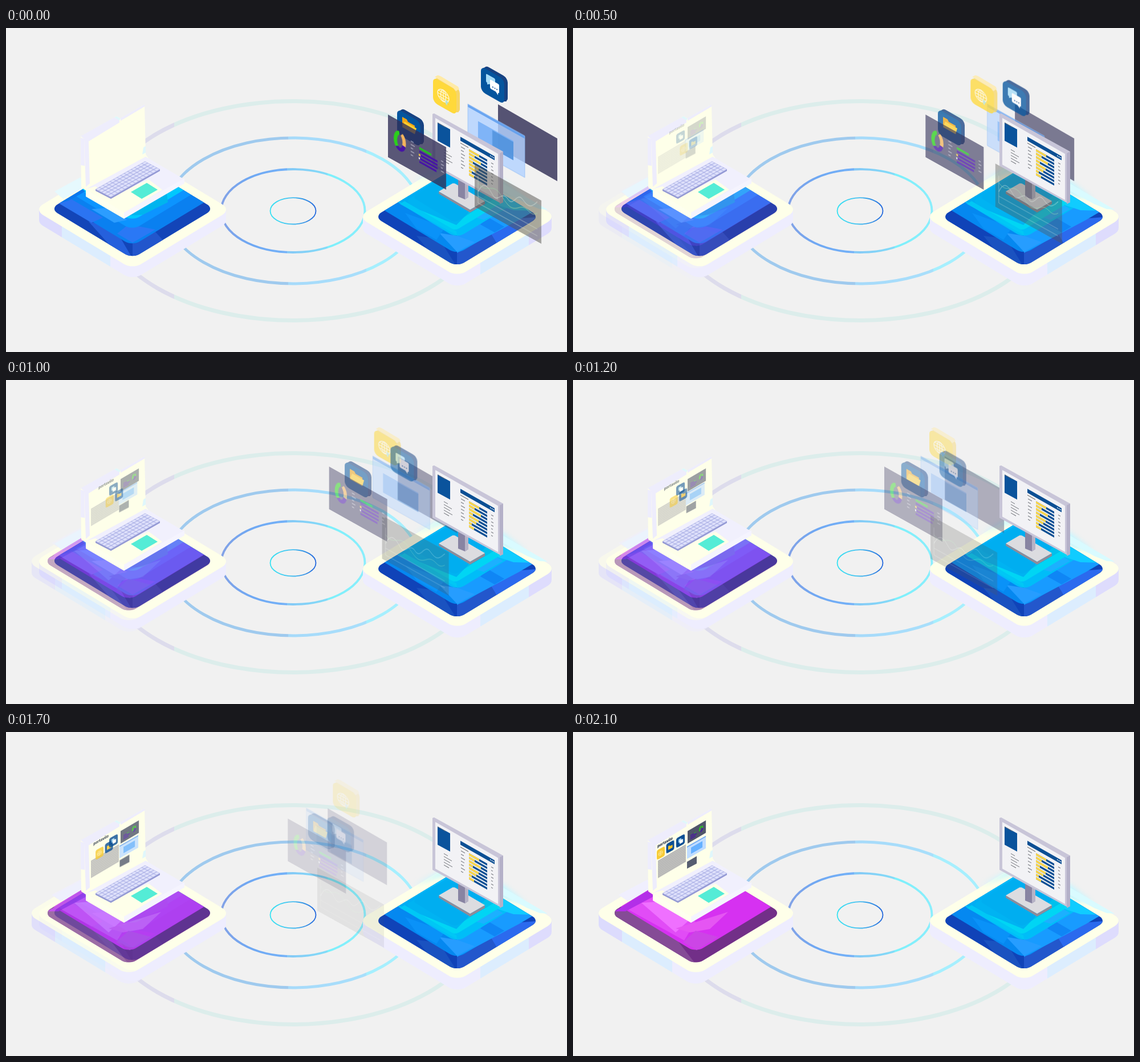
These frames come from a looping animation (984 px wide and 569 px high, 2.2 s). An HTML page without scripts:

```html
<!DOCTYPE html>
<html lang="en">
<head>
<meta charset="utf-8">
<title>Data transfer</title>
<style>
html,body{margin:0;width:100%;height:100%;overflow:hidden;background:#f1f1f1}
svg{display:block;width:984px;height:569px}
.fly,.land{animation:fly 2.2s steps(22,jump-none) infinite}
.land{animation-name:land}
@keyframes fly{
  from{transform:none;opacity:1}
  to{transform:translate(var(--x,0px),var(--y,0px));opacity:0}
}
@keyframes land{
  from{transform:translate(var(--x,0px),var(--y,0px));opacity:0}
  to{transform:none;opacity:1}
}
.brand{font:800 6px Inter,"Open Sans",sans-serif;fill:#16203c;text-anchor:middle}
.ring{fill:none}
</style>
</head>
<body>
<svg viewBox="0 0 984 569">
<defs>
  <linearGradient id="r1"><stop stop-color="#35e2f2"/><stop offset=".5" stop-color="#45bdf0"/><stop offset="1" stop-color="#2468dc"/></linearGradient>
  <linearGradient id="r2"><stop stop-color="#83a2e6"/><stop offset=".2" stop-color="#6fa8f3"/><stop offset=".46" stop-color="#74b2f8"/><stop offset=".46" stop-color="#85c8f6"/><stop offset=".74" stop-color="#82dcf8"/><stop offset=".74" stop-color="#7cf0fb"/><stop offset="1" stop-color="#8aeefc"/></linearGradient>
  <linearGradient id="r3"><stop offset=".48" stop-color="#9fcaee"/><stop offset=".48" stop-color="#a6dafa"/><stop offset=".79" stop-color="#a8dffb"/><stop offset=".79" stop-color="#a6effe"/></linearGradient>
  <linearGradient id="r4"><stop offset=".19" stop-color="#dddcec"/><stop offset=".19" stop-color="#dcedeb"/></linearGradient>
  <linearGradient id="wallA" gradientUnits="userSpaceOnUse" x1="58" x2="386"><stop offset=".122" stop-color="#dcdbfd"/><stop offset=".122" stop-color="#dcedfe"/><stop offset=".381" stop-color="#dcedfe"/><stop offset=".381" stop-color="#eeedfe"/></linearGradient>
  <linearGradient id="wallB" gradientUnits="userSpaceOnUse" x1="45" x2="386"><stop offset=".12" stop-color="#dcdbfd"/><stop offset=".12" stop-color="#dcedfe"/><stop offset=".378" stop-color="#dcedfe"/><stop offset=".378" stop-color="#eeedfe"/></linearGradient>
  <linearGradient id="wallC" gradientUnits="userSpaceOnUse" x1="626" x2="957"><stop offset=".622" stop-color="#eeedfe"/><stop offset=".622" stop-color="#dcedfe"/><stop offset=".878" stop-color="#dcedfe"/><stop offset=".878" stop-color="#dedcfd"/></linearGradient>
  <filter id="soft" x="-20%" y="-20%" width="140%" height="140%"><feGaussianBlur stdDeviation="4"/></filter>

  <rect id="sq" x="-100" y="-100" width="200" height="200" rx="17" transform="matrix(.866 .525 -.866 .525 0 0)"/>
  <clipPath id="tileA"><use href="#sq" transform="translate(221.5 317.500) scale(.83)"/></clipPath>
  <clipPath id="tileB"><use href="#sq" transform="translate(215.500 318) scale(.866)"/></clipPath>
  <clipPath id="tileC"><use href="#sq" transform="translate(791 331.500) scale(.838)"/></clipPath>

  <pattern id="keys" width="1" height="1" patternUnits="userSpaceOnUse"><rect width="1" height="1" fill="#a3a8e2"/><rect x=".07" y=".1" width=".86" height=".8" fill="#dfe1fb"/></pattern>
  <pattern id="rows" width="50" height="3" patternUnits="userSpaceOnUse"><rect width="50" height="3" fill="#c2c2c0"/><rect y="1" width="50" height=".8" fill="#a9a9a9"/></pattern>

  <!-- thick rounded app tile: depth in currentColor, face in fill -->
  <g id="app">
    <g transform="matrix(1 .57 0 1 0 0)">
      <rect x="6" y="-4" width="41" height="44" rx="8" fill="currentColor"/>
      <path d="M3 4 9-2 44-2 39 4ZM39 42 45 38 45 5 39 6Z" fill="currentColor"/>
      <rect y="2" width="41" height="44" rx="8"/>
    </g>
  </g>
  <g id="globe" fill="none" stroke="#fff8dc" stroke-width="1.300">
    <g transform="matrix(1 .57 0 1 18 35)"><circle r="10"/><ellipse rx="4.500" ry="10"/><path d="M-10 0H10M0-10V10M-8.500-5H8.500M-8.500 5H8.500"/></g>
    <path d="M22 41 28 48 25 48 25 52 22 49Z" fill="#b9e3d0" stroke="none"/>
  </g>
  <g id="folder" transform="matrix(1 .57 0 1 9 12)">
    <path d="M0 4H8L10 7H22V20H0Z" fill="#f0a515"/><path d="M4 10H25L22 22H0Z" fill="#ffcf2d"/>
  </g>
  <g id="chat" transform="matrix(1 .57 0 1 9 13)">
    <path d="M2 2H14Q16 2 16 4V15Q16 17 14 17H6L2 20V17Q0 17 0 15V4Q0 2 2 2Z" fill="#a5dcf8"/>
    <path d="M9 8H21Q23 8 23 10V22Q23 24 21 24V28L17 24H9Q7 24 7 22V10Q7 8 9 8Z" fill="#fff"/>
    <path d="M11 19H20" stroke="#134f91" stroke-width="1.800" stroke-dasharray="1.800 1.800"/>
  </g>
  <g id="stats">
    <path d="M0 0H102V75H0Z" fill="#312e57" fill-opacity=".79"/>
    <g fill="none" stroke-width="6" transform="translate(21 35)">
      <path d="M-1-14A7.500 14 0 0 0-5 11" stroke="#2bd01b"/>
      <path d="M-5 11A7.500 14 0 0 0 7 5" stroke="#4612a6"/>
      <path d="M7 5A7.500 14 0 0 0 3-13" stroke="#f4b45c"/>
    </g>
    <path d="M40 24H45M40 30H47M40 36H44M40 42H46M40 48H44M93 29H97M93 35H98M93 41H96M93 47H98" stroke="#d8d8e4"/>
    <path d="M55 28H76" stroke="#20c51c" stroke-width="3.500"/>
    <path d="M55 34H87M55 40H87M55 46H87M55 52H85" stroke="#4612a6" stroke-width="3.500"/>
    <path d="M54 40H57" stroke="#ffd23a" stroke-width="3"/><path d="M54 46H56" stroke="#fff" stroke-width="3"/>
  </g>
</defs>

<rect width="984" height="569" fill="#f1f1f1"/>
<g class="ring">
  <ellipse cx="503.500" cy="321" rx="336" ry="192.500" stroke="url(#r4)" stroke-width="7"/>
  <ellipse cx="503.500" cy="321" rx="222" ry="128" stroke="url(#r3)" stroke-width="5"/>
  <ellipse cx="503.500" cy="321" rx="126" ry="73" stroke="url(#r2)" stroke-width="3.800"/>
  <ellipse cx="503.500" cy="321.300" rx="40" ry="23.200" stroke="url(#r1)" stroke-width="1.800"/>
</g>

<!-- left platform, blue -->
<g fill="url(#wallA)"><path d="M58 319H386V338H58Z"/><g transform="translate(0 19)"><path d="M58 319H386"/></g></g>
<clipPath id="hullA"><use href="#sq" transform="translate(222 338) scale(.996)"/></clipPath>
<rect x="50" y="230" width="345" height="215" fill="url(#wallA)" clip-path="url(#hullA)"/>
<use href="#sq" transform="translate(222 319) scale(.996)" fill="#feffe9"/>
<path d="M85 287 131 262 136 281 100 300Z" fill="#e6f9fd"/>
<g clip-path="url(#tileA)">
  <path d="M80 230H365V405H80Z" fill="#1345b8"/>
  <path d="M145 340 190 350 222 405 185 385Z" fill="#2560dc"/>
  <path d="M222 375 262 358 282 380 222 405Z" fill="#2256cc"/>
  <use href="#sq" transform="translate(221.500 295.500) scale(.83)" fill="#0a80f0"/>
  <path d="M86 304 110 298 170 333 150 342Z" fill="#2b74f2"/>
  <path d="M222 377 195 361 215 345 262 354Z" fill="#2a78f5"/>
  <use href="#sq" transform="translate(221.500 268) scale(.83)" fill="#0c94ff"/>
  <path d="M150 318 180 316 212 337 190 342Z" fill="#2c9dff"/>
  <use href="#sq" transform="translate(221.500 252) scale(.83)" fill="#00c8fd"/>
  <path d="M205 330 282 290 284 306 240 328Z" fill="#00b4ee"/>
  <path d="M85 310 131 281 139 287 110 303Z" fill="#0878ee"/>
</g>

<!-- left platform, magenta -->
<g class="land">
  <clipPath id="hullB"><use href="#sq" transform="translate(215.500 338.500) scale(1.036)"/></clipPath>
  <path d="M45 319H386V338H45Z" fill="url(#wallB)"/>
  <rect x="40" y="230" width="350" height="215" fill="url(#wallB)" clip-path="url(#hullB)"/>
  <use href="#sq" transform="translate(215.500 318.500) scale(1.036)" fill="#feffe9"/>
  <path d="M80 286 131 259 136 281 96 297Z" fill="#f0effe"/>
  <g clip-path="url(#tileB)">
    <path d="M70 230H365V410H70Z" fill="#722f88"/>
    <path d="M70 310H140L217 410H70Z" fill="#854b96"/>
    <use href="#sq" transform="translate(215.500 296) scale(.866)" fill="#d631f1"/>
    <path d="M88 307 128 283 215 333 195 366Z" fill="#e14cf6"/>
    <path d="M120 300 150 298 204 330 180 352Z" fill="#ef70ff"/>
    <path d="M180 345 272 316 240 346 205 352Z" fill="#e555f3"/>
    <path d="M217 383 193 369 215 349 255 360Z" fill="#cc45e6"/>
    <path d="M73 315 131 279 143 288 92 315Z" fill="#b32fe8"/>
  </g>
</g>

<!-- laptop -->
<path d="M131 191 194 155 201 159 243 134 245 222 250 229 147 290 132 280Z" fill="#feffe9"/>
<path d="M131 190 190 157 199 161 199 166 145 199 147 273 140 279 137 195ZM201 158 243 134 243 138 201 163Z" fill="#eeedfc"/>
<path d="M131 192 137 195 138 242 131 241Z" fill="#eeedfc"/>
<path d="M190 157 194 155 201 159 199 162Z" fill="#e0f7fb"/>
<path d="M239 222 245 219 245 207 241 210Z" fill="#e0f7fb"/>
<path d="M140 283 245 226 313 266 207 327Z" fill="#f1f0fd"/>
<path d="M140 283 157 278 184 297 250 266 274 284 207 325Z" fill="#feffe9"/>
<path d="M140 283 207 324 207 335 140 296Z" fill="#feffee"/>
<path d="M207 324 313 264 313 273 207 335Z" fill="#f5f4fe"/>
<path d="M157 283 184 297 270 248 270 251 184 300 157 286Z" fill="#9298d4"/>
<rect width="14" height="5" fill="url(#keys)" transform="matrix(6.2 -3.500 5.300 2.800 157 283)"/>
<path d="M219 288 247 272 266 284 238 300Z" fill="#54ecd6"/>

<!-- laptop screen content -->
<g class="land"><rect width="49" height="31" fill="url(#rows)" transform="matrix(1 -.59 0 1 149 226)"/></g>
<g class="land"><g transform="matrix(1 -.59 0 1 201 174)">
  <path d="M0 0H32V22H0Z" fill="#50566a"/>
  <g fill="none" stroke-width="2.200"><path d="M24 6A2.500 4 0 0 0 22 13" stroke="#2bd01b"/><path d="M22 13A2.500 4 0 0 0 26 10" stroke="#4612a6"/><path d="M26 10A2.500 4 0 0 0 25 6" stroke="#2bd01b"/></g>
  <path d="M5 11H15M5 14H16M5 17H14" stroke="#4612a6" stroke-width="1.600"/>
  <path d="M11 10.500H15" stroke="#2bd01b"/>
</g></g>
<g class="land" style="--x:-5px;--y:-6px"><g transform="matrix(1 -.57 0 1 200 201)">
  <path d="M0 0H33V22H0Z" fill="#bfdcff"/><path d="M0 0H33V2H0Z" fill="#70a9f2"/><path d="M7 6H27V17H7Z" fill="#66b1ff"/>
</g></g>
<g class="land" style="--x:-3px;--y:-14px"><path d="M200 228 217 218 217 231 200 240Z" fill="#565d70"/></g>
<g class="land" style="--x:27px;--y:-22px"><text class="brand" transform="matrix(1 -.55 0 1 161.500 196)">portavilo</text></g>
<g class="land" style="--x:53px"><g transform="matrix(1 -.55 0 1 147 208)">
  <rect width="14" height="17" rx="3" fill="#f7cb35"/><g fill="none" stroke="#fff3c0" stroke-width=".7"><circle cx="6.500" cy="8.500" r="3.500"/><path d="M3 8.500H10M6.500 5V12"/></g>
</g></g>
<g class="land" style="--x:53px"><g transform="matrix(1 -.55 0 1 163.500 197)">
  <rect width="14" height="17" rx="3" fill="#0b4f94"/><path d="M3.500 5.500H6L7 7H11V12H3.500Z" fill="#ffc629"/>
</g></g>
<g class="land"><g transform="matrix(1 -.55 0 1 181 187)">
  <rect width="15" height="17" rx="3" fill="#0b4f94"/><rect x="4" y="4" width="5" height="6" rx="1" fill="#a5dcf8"/><rect x="6" y="7" width="6" height="6" rx="1" fill="#fff"/>
</g></g>

<!-- right platform -->
<clipPath id="hullC"><use href="#sq" transform="translate(791.500 352) scale(1.005)"/></clipPath>
<path d="M626 331H957V352H626Z" fill="url(#wallC)"/>
<rect x="620" y="240" width="345" height="220" fill="url(#wallC)" clip-path="url(#hullC)"/>
<use href="#sq" transform="translate(791.500 331.500) scale(1.005)" fill="#feffe9"/>
<path d="M715 270 785 232 872 268 912 300 880 296 780 248Z" fill="#c4f6ff" filter="url(#soft)"/>
<path d="M866 283 914 309 936 318 950 319 873 274Z" fill="#d9fbff"/>
<g clip-path="url(#tileC)">
  <path d="M650 240H932V420H650Z" fill="#1043b8"/>
  <path d="M720 365 760 370 791 420H765Z" fill="#1a52c0"/>
  <path d="M791 380 850 350 865 380 791 420Z" fill="#2357cc"/>
  <path d="M850 360 895 335 932 332 865 385Z" fill="#2b6aee"/>
  <use href="#sq" transform="translate(791 309.500) scale(.838)" fill="#0588f0"/>
  <path d="M791 345 860 310 929 320 900 337 791 395Z" fill="#189bff"/>
  <path d="M760 360 791 365 822 376 791 393Z" fill="#269dff"/>
  <path d="M832 345 845 332 874 349 857 359Z" fill="#0f86f5"/>
  <path d="M700 325 770 350 755 372 720 352Z" fill="#0a92f8"/>
  <use href="#sq" transform="translate(791 281) scale(.838)" fill="#00bdf8"/>
  <path d="M838 337 872 318 850 305 815 330Z" fill="#1cb0ff"/>
  <path d="M860 310 890 320 929 321 872 290Z" fill="#10ccff"/>
  <use href="#sq" transform="translate(787 304) scale(.5)" fill="#00d5f4"/>
  <use href="#sq" transform="translate(787 297) scale(.43)" fill="#00c0ec"/>
  <path d="M690 305 790 248 850 285 790 346Z" fill="#00a8f2" opacity=".75"/>
  <path d="M699 304 790 357 791 364 691 309Z" fill="#00c7f5"/>
</g>

<!-- pieces behind the monitor -->
<g class="fly" style="--x:-369px"><path d="M863 134 967 194V269L863 210Z" fill="#555373"/></g>
<g class="fly" style="--x:-350px"><g transform="matrix(1 .56 0 1 810 133.500)">
  <path d="M0 0H100V73H0Z" fill="#b2d2ff" fill-opacity=".82"/>
  <path d="M0 0H100V5H0Z" fill="#5b9cee" fill-opacity=".85"/>
  <path d="M18 20H80V54H18Z" fill="#70acf6" fill-opacity=".8"/>
  <path d="M43 22H80V54H43Z" fill="#3f86d2" fill-opacity=".6"/>
  <path d="M0 0H100V73H0Z" fill="none" stroke="#8fbcf5" stroke-width=".8"/>
</g></g>
<g class="fly" style="--x:-217px"><g transform="translate(749 84)"><g fill="#ffd93b" color="#f7d667"><use href="#app"/></g><path d="M3 2 8-1Q10-1 14 1L44 19 46 23 40 27 36 22Z" fill="#ffeaa6"/><use href="#globe"/></g></g>
<g class="fly" style="--x:-333px;--y:99px"><g transform="translate(833 65)"><g fill="#04559e" color="#174282"><use href="#app"/></g><use href="#chat"/></g></g>

<!-- monitor -->
<path d="M759 287 814 319 840 304V309L814 324 759 291Z" fill="#8f8b98"/>
<path d="M759 287 783 273Q786 272 789 274L840 304 814 319Z" fill="#dcdce0"/>
<path d="M793 262H811V297L805 301 793 296Z" fill="#8884a2"/><path d="M805 268H811V297L805 301Z" fill="#b6b3c6"/>
<path d="M748 151 751 150 872 217V306L868 308 748 242Z" fill="#c8c5d8"/>
<path d="M866 220 872 217V306L866 309Z" fill="#b4b0c8"/>
<path d="M753 158 863 221V302L753 240Z" fill="#f2f2f5"/>
<path d="M757 166 779 178V210L757 198Z" fill="#0a539c"/>
<g transform="matrix(1 .57 0 1 797 191)">
  <path d="M0 0H60V7H0Z" fill="#0b4f94"/>
  <path d="M52 3.500H59" stroke="#fff" stroke-width="1.600" stroke-dasharray="1.600 1.100"/>
  <path d="M0 11H14" stroke="#555"/>
  <path d="M1 17H8M1 23H6M1 29H8M1 35H7M1 41H6M1 47H8M1 53H5M54 15H58M54 21H57M54 27H58M54 33H58M54 39H57M54 45H58M54 51H57" stroke="#777a80" stroke-width="1.200"/>
  <path d="M15 15H47M15 21H47M15 27H47M15 33H47M15 39H47M15 45H47M15 51H47M15 57H47" stroke="#0b4f94" stroke-width="3.800"/>
  <path d="M15 15H33M15 21H25M15 27H36M15 33H22M15 39H32M15 45H28M15 51H20M15 57H24" stroke="#ffd84a" stroke-width="3.800"/>
  <path d="M-40-2H-26M-29 39H-22M-29 44H-15M-29 49H-18M-29 54H-14M-29 59H-20" stroke="#6f7278" stroke-width="1.100"/>
</g>

<!-- pieces in front -->
<g class="fly" style="--x:-193px"><g transform="translate(686 140)"><g fill="#04559e" color="#174282"><use href="#app"/></g><use href="#folder"/></g></g>
<g class="fly" style="--x:-217px"><use href="#stats" transform="matrix(1 .56 0 1 670 152)"/></g>
<g class="fly" style="--x:-341px"><g transform="matrix(1 .556 0 1 822 238)">
  <path d="M0 0H117V76H0Z" fill="#55524f" fill-opacity=".5"/>
  <g fill="none" stroke="#d5dfd8" stroke-width=".8">
    <path d="M6 18V66H110M6 54H110" opacity=".7"/>
    <path d="M6 46C16 20 24 28 32 38S48 20 58 30 74 8 84 16 98 24 110 6"/>
    <path d="M6 30C20 44 30 16 44 28S62 48 78 34 96 42 110 26" stroke="#9ecfa4"/>
  </g>
</g></g>
</svg>
</body>
</html>
```
